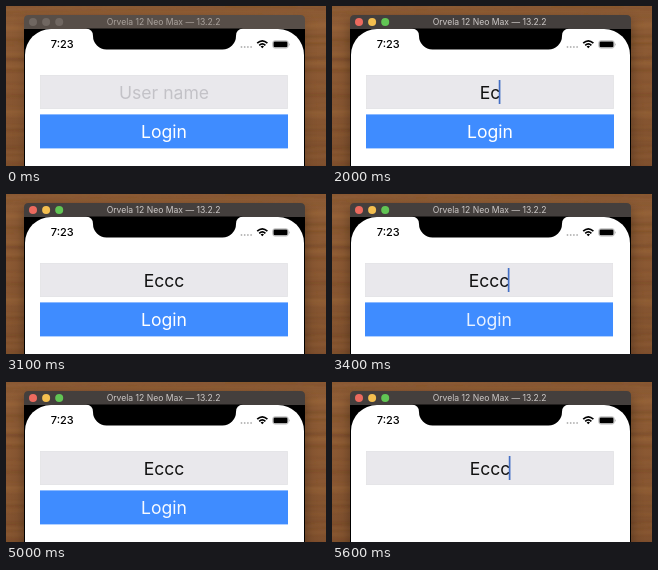
Write an HTML page that moves like this. It is 320 by 160 pixels and loops after 5700 ms.

```html
<!DOCTYPE html>
<html lang="en">
<head>
<meta charset="utf-8">
<title>Login form</title>
<style>
  html, body { margin: 0; width: 100%; height: 100%; overflow: hidden; background: #80502e; }
  svg { display: block; width: 100%; height: 100%; }
  text { font-family: Inter, "Liberation Sans", sans-serif; text-anchor: middle; }
  .big { font-size: 17.6px; }
</style>
</head>
<body>
<svg viewBox="0 0 320 160">
  <defs>
    <linearGradient id="wood" x2="0" y2="1">
      <stop offset="0" stop-color="#8d5c36"/>
      <stop offset=".4" stop-color="#8b5933"/>
      <stop offset="1" stop-color="#7f502e"/>
    </linearGradient>
    <filter id="blur" x="-10%" y="-10%" width="120%" height="120%">
      <feGaussianBlur stdDeviation="6"/>
    </filter>
    <filter id="soft"><feGaussianBlur stdDeviation="1.2 .8"/></filter>
    <clipPath id="screen"><rect x="19" y="23" width="279" height="137"/></clipPath>
  </defs>

  <rect width="320" height="160" fill="url(#wood)"/>
  <g id="grain" fill="none" filter="url(#soft)"></g>
  <rect id="shadow" x="17" y="14" width="283" height="170" filter="url(#blur)"/>

  <path id="bar" d="M18 24V13.5Q18 9 22.5 9H294.5Q299 9 299 13.5V24Z"/>
  <g id="lights"></g>
  <text id="title" x="157.6" y="19.2" font-size="8.6">Orvela 12 Neo Max — 13.2.2</text>

  <rect x="18" y="23" width="281" height="137"/>
  <path d="M19 160V49A26 26 0 0 1 45 23H272A26 26 0 0 1 298 49V160Z" fill="#fff"/>
  <path d="M80 22.5H237Q230 23 230 30A13.5 13.5 0 0 1 216.5 43.5H100.5A13.5 13.5 0 0 1 87 30Q87 23 80 22.5Z"/>

  <text x="56.3" y="42" font-size="11" font-weight="500">7:23</text>
  <g fill="#b4b4b4">
    <circle cx="235.5" cy="41" r=".9"/><circle cx="238.7" cy="41" r=".9"/>
    <circle cx="241.9" cy="41" r=".9"/><circle cx="245.1" cy="41" r=".9"/>
  </g>
  <g fill="none" stroke="#000" stroke-width="1.7">
    <path d="M251.2 37.2Q256.3 32.6 261.4 37.2M253.2 39.3Q256.3 36.6 259.4 39.3"/>
    <path d="M254.6 40.4Q256.3 39 258 40.4L256.3 42.2Z" fill="#000" stroke="none"/>
  </g>
  <rect x="266.7" y="34.7" width="15.6" height="7.4" rx="2.2" fill="none" stroke="#aaa" stroke-width=".7"/>
  <rect x="267.5" y="35.5" width="14" height="5.8" rx="1.3"/>
  <path d="M283.3 37V40Q284.6 38.5 283.3 37Z" fill="#999"/>

  <g clip-path="url(#screen)">
    <g id="form">
      <rect x="34.3" y="69.3" width="247.4" height="33.4" fill="#e9e8ec" stroke="#e0dfe3" stroke-width=".6"/>
      <text id="hint" class="big" x="158" y="93" fill="#c3c2c7">User name</text>
      <text id="value" class="big" x="158" y="93" fill="#111"></text>
      <rect id="caret" y="74" width="1.7" height="24" fill="#446fc5"/>
      <g id="button">
        <rect id="face" x="34" y="108.4" width="248" height="34"/>
        <text id="label" class="big" x="158" y="132" fill="#fff">Login</text>
      </g>
    </g>
  </g>
</svg>
<script>
const LOOP = 5700;
const NAME = "Eccc";
const KEYS = [1700, 1900, 2100, 2200];
const TAPS = [2600, 3200, 4600];
const SHAKES = [2600, 3200];
const FOCUS = 1600;

const el = id => document.getElementById(id);
const set = (node, attrs) => { for (const k in attrs) node.setAttribute(k, attrs[k]); };
const clamp = v => Math.max(0, Math.min(1, v));
const ramp = (t, from, to) => clamp((t - from) / (to - from));
const mix = (a, b, p) => `rgb(${a.map((v, i) => Math.round(v + (b[i] - v) * p))})`;

function add(parent, tag, attrs) {
  const node = document.createElementNS("http://www.w3.org/2000/svg", tag);
  set(node, attrs);
  return parent.appendChild(node);
}

// wood grain
let seed = 7;
const rand = () => (seed = (seed * 16807) % 2147483647) / 2147483647;
for (let i = 0; i < 36; i++) {
  const y = rand() * 160, bend = () => y + (rand() - .5) * 8;
  add(el("grain"), "path", {
    d: `M-5 ${y}C90 ${bend()} 220 ${bend()} 325 ${bend()}`,
    stroke: rand() < .55 ? "#573018" : "#a5713f",
    "stroke-width": 1 + rand() * 2.5,
    opacity: .08 + rand() * .2
  });
}

const GREY = [112, 103, 97];
const lights = [[236, 106, 94], [244, 191, 79], [97, 197, 84]].map((color, i) =>
  ({ color, node: add(el("lights"), "circle", { cx: 27 + i * 13.1, cy: 16, r: 4 }) }));

function shake(t) {
  let x = 0;
  for (const start of SHAKES) {
    const dt = t - start;
    if (dt > 0 && dt < 500) x += 5.3 * (1 - dt / 500) ** 3 * Math.sin(dt / 300 * 2 * Math.PI);
  }
  return x;
}

function caretAlpha(t) {
  if (t < FOCUS) return 0;
  if (t < 2700) return 1;
  const phase = (t - 2700) % 1000;
  return phase < 500 ? 1 - ramp(phase, 0, 250) : ramp(phase, 500, 700);
}

function labelAlpha(t) {
  const tap = TAPS.find(s => t >= s && t < s + 500);
  return tap === undefined ? 1 : .8 + .2 * (t - tap) / 500;
}

function draw(t) {
  const on = ramp(t, 20, 300);
  set(el("bar"), { fill: mix([87, 78, 72], [68, 63, 61], on) });
  set(el("title"), { fill: mix([170, 162, 156], [205, 201, 199], on) });
  set(el("shadow"), { opacity: .15 + .15 * on });
  for (const l of lights) set(l.node, { fill: mix(GREY, l.color, on) });

  const count = KEYS.filter(k => t >= k).length;
  const value = el("value");
  const typed = NAME.slice(0, count);
  if (value.textContent !== typed) value.textContent = typed;
  const half = count ? value.getComputedTextLength() / 2 : 0;
  set(el("hint"), { opacity: count ? 0 : 1 });
  set(el("caret"), { x: 156.4 + half, opacity: caretAlpha(t) });

  set(el("form"), { transform: `translate(${shake(t).toFixed(2)} 0)` });
  set(el("label"), { opacity: labelAlpha(t) });
  set(el("face"), { fill: mix([63, 140, 255], [63, 185, 255], ramp(t, 5020, 5200)) });
  set(el("button"), { opacity: (1 - ramp(t, 5020, 5400)) ** 3 });
}

const begin = performance.now();
function tick() {
  draw((performance.now() - begin) % LOOP);
  requestAnimationFrame(tick);
}
tick();
</script>
</body>
</html>
```
